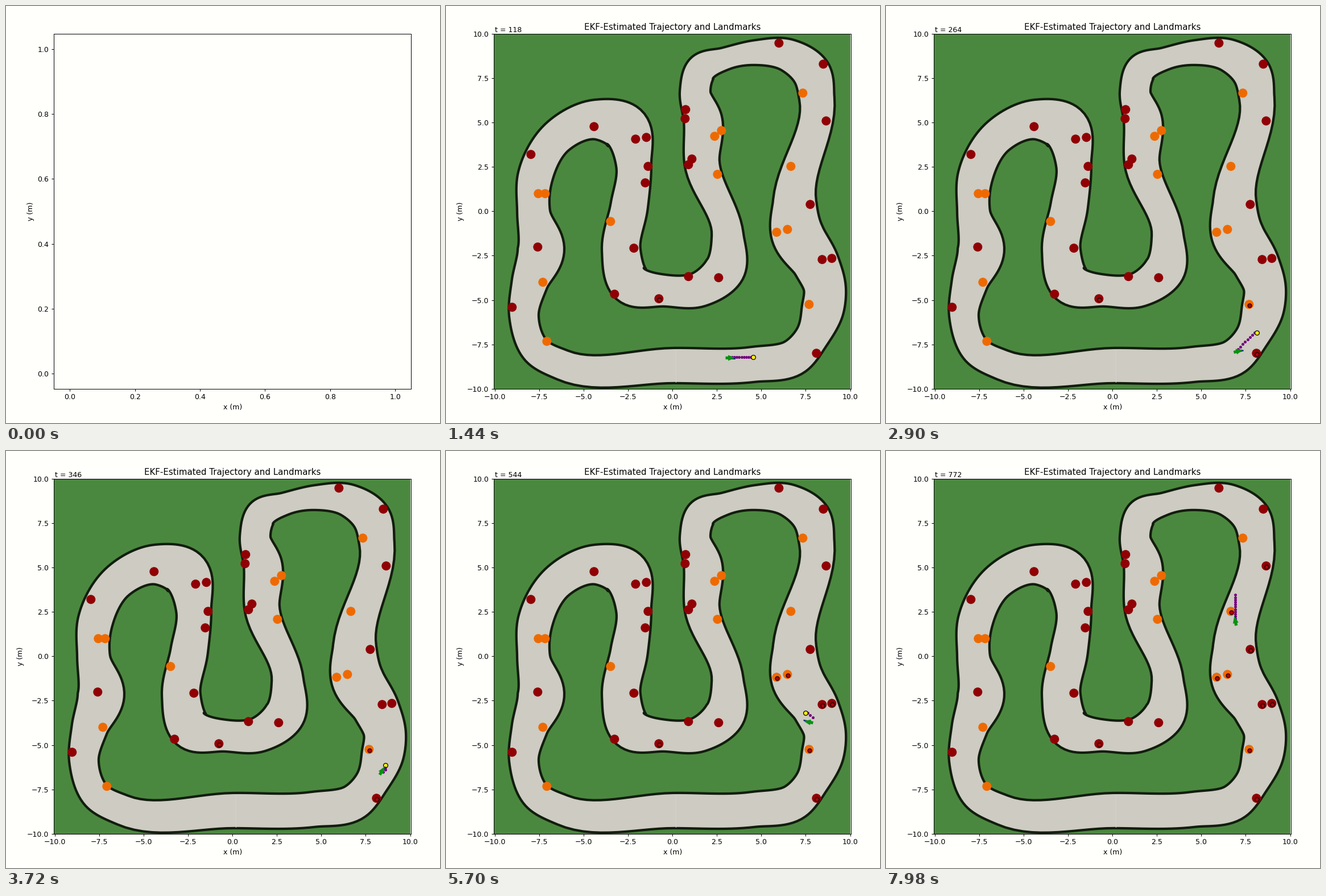
These frames come from a looping animation (763 by 734 pixels, 8 s). A matplotlib script:

```python
import numpy as np
import matplotlib.pyplot as plt
from matplotlib.animation import FuncAnimation
from matplotlib.collections import PatchCollection
from matplotlib.patches import Circle, Polygon, Rectangle

W, H, DPI = 763, 734, 90
FRAMES, INTERVAL, BLANK = 400, 20, 13
SCALE = 31.22                 # pixels per metre
ORIGIN = np.array([398.3, 361.5])
CELL = 4.17                   # planner grid step in pixels
SENSOR_RANGE = 112
MARK_RADIUS = 8
DRIFT = (1.3, 2.1)            # offset of every landmark estimate
REPLAN, FIRST_PLAN, LOOKAHEAD = 51, 5, 60
PAPER, GRASS, ROAD, KERB = "#fffffc", "#4b883f", "#cdcbc2", "#121d0e"
RED, ORANGE = "#900004", "#ee6a00"

# centre line of the road: x, y, half width
COURSE = [
    (400, 633, 31), (540, 631, 31), (614, 617, 32), (643, 583, 30),
    (662, 535, 37), (666, 497, 37), (651, 455, 41), (617, 399, 46),
    (613, 342, 38), (652, 163, 31), (642, 117, 34), (602, 87, 29),
    (545, 82, 22), (490, 93, 20), (449, 111, 27), (438, 150, 27),
    (452, 202, 34), (450, 275, 31), (495, 402, 28), (490, 464, 36),
    (445, 499, 31), (385, 501, 28), (325, 489, 37), (308, 430, 34),
    (322, 353, 33), (330, 280, 31), (313, 214, 43), (262, 200, 35),
    (195, 231, 31), (157, 300, 31), (154, 362, 29), (167, 430, 41),
    (147, 488, 32), (137, 545, 26), (159, 607, 26), (205, 632, 27),
]
RED_MARKS = [
    (585, 65), (663, 102), (668, 202), (640, 349), (661, 446), (678, 444),
    (651, 611), (421, 182), (420, 198), (432, 269), (426, 279), (260, 212),
    (333, 234), (352, 231), (355, 282), (350, 311), (149, 261), (161, 424),
    (330, 426), (426, 476), (479, 478), (296, 507), (374, 515), (116, 530),
]
ORANGE_MARKS = [
    (627, 153), (606, 282), (484, 219), (472, 229), (477, 296), (289, 379),
    (162, 330), (174, 330), (170, 486), (177, 590), (638, 525), (581, 398),
    (600, 393),
]
# time, x, y
ROUTE = np.array([
    (0, 404, 619.5), (118, 500, 619.5), (215, 580, 617), (263, 619, 608),
    (328, 657, 570), (427, 681, 530), (492, 673, 484), (544, 637, 477),
    (574, 632, 462), (675, 629, 374), (772, 614, 299), (860, 614, 230),
])
ARROW = np.array([(8.5, 0), (-4, 5), (-4, 2.6), (-8.5, 2.6),
                  (-8.5, -2.6), (-4, -2.6), (-4, -5)])


def to_data(points):
    """Stage pixels to map metres."""
    return (np.asarray(points, float) - ORIGIN) * (1, -1) / SCALE


def smooth_loop(keys, samples=14):
    """Closed cubic curve through the keys, spaced by chord length."""
    p = np.array(keys[-2:] + keys + keys[:3], float)
    u = np.r_[0, np.cumsum(np.hypot(*np.diff(p[:, :2], axis=0).T))]
    slope = np.gradient(p, u, axis=0)
    s = np.linspace(0, 1, samples, endpoint=False)[:, None]
    parts = []
    for i in range(2, len(p) - 3):
        h = u[i + 1] - u[i]
        parts.append((1 + 2 * s) * (1 - s) ** 2 * p[i]
                     + s * (1 - s) ** 2 * h * slope[i]
                     + s ** 2 * (3 - 2 * s) * p[i + 1]
                     + s ** 2 * (s - 1) * h * slope[i + 1])
    return np.vstack(parts)


def road_edges():
    curve = smooth_loop(COURSE)
    centre, half = curve[:, :2], curve[:, 2:]
    tangent = np.roll(centre, -1, axis=0) - np.roll(centre, 1, axis=0)
    normal = tangent[:, ::-1] * (1, -1) / np.hypot(*tangent.T)[:, None]
    return centre - normal * half, centre + normal * half


def position(t):
    return np.array([np.interp(t, ROUTE[:, 0], ROUTE[:, k]) for k in (1, 2)])


def heading(t):
    """Unit vector of the last few steps' travel."""
    t = max(t, 12)
    step = position(t) - position(t - 12)
    return step / np.hypot(*step)


def plan(start):
    """Grid path of straight and diagonal moves to a point further on."""
    goal = position(start + LOOKAHEAD)
    dx, dy = np.rint((goal - position(start)) / CELL).astype(int)
    diagonal, longest = sorted((abs(dx), abs(dy)))
    slant = np.sign([dx, dy])
    straight = slant * ((1, 0) if abs(dx) > abs(dy) else (0, 1))
    runs = [[straight] * (longest - diagonal), [slant] * diagonal]
    if 4 * diagonal > longest:
        runs.reverse()
    steps = np.array([(0, 0)] + runs[0] + runs[1])
    return goal + (np.cumsum(steps, axis=0) - (dx, dy)) * CELL


def one_decimal(value, _):
    return f"{value:.1f}".replace("-", "\u2212")


def make_axes(xlim, ylim, ticks):
    axes = fig.add_axes([84.2 / W, 1 - 673.6 / H, 628.2 / W, 624.3 / H],
                        facecolor=PAPER)
    axes.set(xlim=xlim, ylim=ylim, xticks=ticks, yticks=ticks,
             xlabel="x (m)", ylabel="y (m)")
    for axis in (axes.xaxis, axes.yaxis):
        axis.set_major_formatter(one_decimal)
    return axes


def dots(size, color, edge, zorder):
    return ax.plot([], [], "o", ms=size, mfc=color, mec=edge,
                   mew=1 if edge != "none" else 0, zorder=zorder)[0]


plt.rcParams["font.family"] = "DejaVu Sans"
fig = plt.figure(figsize=((W + 0.001) / DPI, (H + 0.001) / DPI), dpi=DPI,
                 facecolor=PAPER)
empty = make_axes((-0.0492, 1.0492), (-0.0459, 1.0459), np.linspace(0, 1, 6))
ax = make_axes((-10.06, 10.06), (-10, 10), np.linspace(-10, 10, 9))
ax.set_title("EKF-Estimated Trajectory and Landmarks", fontsize=12)

ax.add_patch(Rectangle((-10.06, -10), 20.06, 20, fc=GRASS, lw=0))
for edge, fill in zip(road_edges(), (ROAD, GRASS)):
    ax.add_patch(Polygon(to_data(edge), fc=fill, ec=KERB, lw=3.4,
                         joinstyle="round"))
ax.plot(*to_data([(404, 606), (404, 662)]).T, color="#d3d1c9", lw=0.8)
for marks, color in ((RED_MARKS, RED), (ORANGE_MARKS, ORANGE)):
    circles = [Circle(xy, MARK_RADIUS / SCALE) for xy in to_data(marks) + (0.01, -0.01)]
    ax.add_collection(PatchCollection(circles, fc=color, lw=0, zorder=3))

label = ax.text(-10, 10.1, "", fontsize=10)
seen = dots(5.6, "#b00008", "#140000", 4)
trail = dots(4, "#70007a", "none", 5)
target = dots(6.2, "#fff200", "black", 6)
truth, = ax.plot([], [], color="#1c1c90", lw=1.6, zorder=7)
robot = ax.add_patch(Polygon(to_data(ARROW), fc="#0a9014", lw=0, zorder=8))

# a landmark is estimated from the first moment it comes within range
landmarks = np.array(RED_MARKS + ORANGE_MARKS)
times = np.arange(773)
track = position(times)
gaps = np.hypot(*(landmarks[:, :, None] - track).transpose(1, 0, 2))
in_range = gaps < SENSOR_RANGE
seen_from = np.where(in_range.any(axis=1), in_range.argmax(axis=1), np.inf)


def update(frame):
    running = frame >= BLANK
    empty.set_visible(not running)
    ax.set_visible(running)
    if not running:
        return []
    t = (frame - BLANK) * INTERVAL // 10
    label.set_text(f"t = {t}")
    seen.set_data(*to_data(landmarks[seen_from <= t] + DRIFT).T)

    here = position(t)
    start = max(0, FIRST_PLAN + (t - FIRST_PLAN) // REPLAN * REPLAN)
    path = plan(start)
    goal = path[-1]
    ahead = np.hypot(*(path - goal).T) <= np.hypot(*(here - goal)) + 4
    trail.set_data(*to_data(path[ahead]).T)
    target.set_data(*to_data([goal]).T)
    target.set_visible(t - start >= 3)

    c, s = heading(t)
    turn = np.array([(c, s), (-s, c)])
    robot.set_xy(to_data(ARROW @ turn + here))
    truth.set_data(*to_data(np.array([(-3, 1.5), (8, 1.5)]) @ turn + here).T)
    return [label, seen, trail, target, truth, robot]


anim = FuncAnimation(fig, update, frames=FRAMES, interval=INTERVAL,
                     repeat=True, repeat_delay=0, cache_frame_data=False)
plt.show()
```
